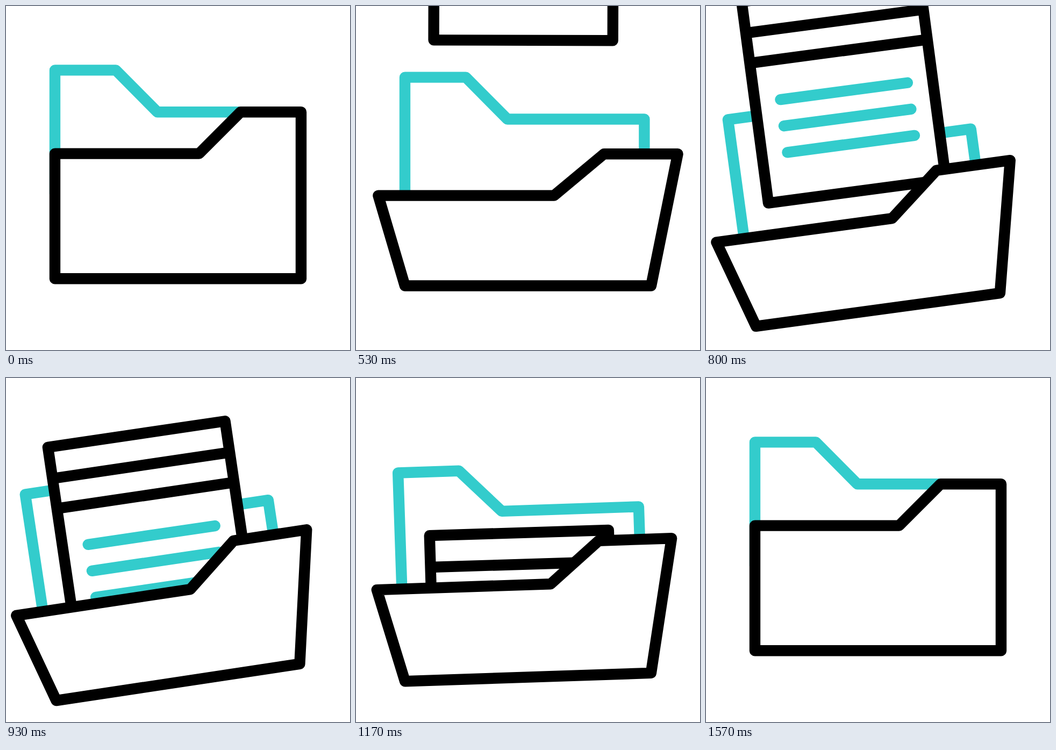
An HTML page that plays this animation: 640x640 px, repeating every 2000 ms.

```html
<!DOCTYPE html>
<html lang="en">
<head>
<meta charset="utf-8">
<title>Folder</title>
<style>
  html, body { margin: 0; width: 100%; height: 100%; overflow: hidden; background: #fff; }
  svg { display: block; width: 100%; height: 100%; }
  path { fill: none; stroke: #000; stroke-width: 20.4; stroke-linejoin: round; }
  .teal { stroke: #3cc; }
  .solid { fill: #fff; }
  .round { stroke-linecap: round; }
</style>
</head>
<body>
<svg viewBox="0 0 640 640">
  <clipPath id="pocket"><rect x="-200" y="-700" width="1040" height="1200"/></clipPath>
  <g id="folder">
    <path class="teal" d="M91 350V119.4H204.3L281.6 197.2H536.4V300"/>
    <g clip-path="url(#pocket)">
      <g id="paper">
        <path class="solid" d="M0 0H333.2V377.8H0Z"/>
        <path d="M0 58.8H333.2M0 115.2H333.2"/>
        <path class="teal round" d="M47.6 190h238.5m-238.5 49.5h238.5m-238.5 49.5h238.5"/>
      </g>
    </g>
    <path id="front" class="solid"/>
  </g>
</svg>
<script>
const LOOP = 2000, FPS = 30;
const [folder, paper, front] = ['folder', 'paper', 'front'].map(id => document.getElementById(id));

// Smooth 0 to 1 while the frame goes from a to b
function ease(f, a, b) {
  const u = Math.min(1, Math.max(0, (f - a) / (b - a)));
  return u * u * (3 - 2 * u);
}

function draw(f) {
  // The flap opens, sags a little, then shuts
  const open = ease(f, 0, 18.7) - 0.115 * ease(f, 21, 36) - 0.885 * ease(f, 38.2, 47);
  const drop = 58.7 * (ease(f, 12, 25) - ease(f, 32, 43.8));
  // Lean back, swing over, settle
  const tilt = -9.65 * ease(f, 16, 27.2) + 14.65 * ease(f, 27.2, 32)
    - 8.2 * ease(f, 32, 36) + 3.2 * ease(f, 36, 40);
  const slide = -409.5 + 728 * ease(f, 9.2, 41.7);

  const side = 52.6 * open, low = 274.6 + 68.7 * open, high = low - 77.4;
  front.setAttribute('d', `M${91 - side} ${low}H${359.2 + 9.8 * open}`
    + `L${436.4 + 26.4 * open} ${high}H${549 + side}L549 507.3H91Z`);
  folder.setAttribute('transform', `translate(0 ${drop}) rotate(${tilt} 320 507.3)`);
  paper.setAttribute('transform', `translate(145.7 ${slide}) rotate(0.17 166.6 0)`);
}

function tick() {
  const t = performance.now() % LOOP;
  draw(Math.floor((t + 3.4) * FPS / 1000));
  requestAnimationFrame(tick);
}
tick();
</script>
</body>
</html>
```
